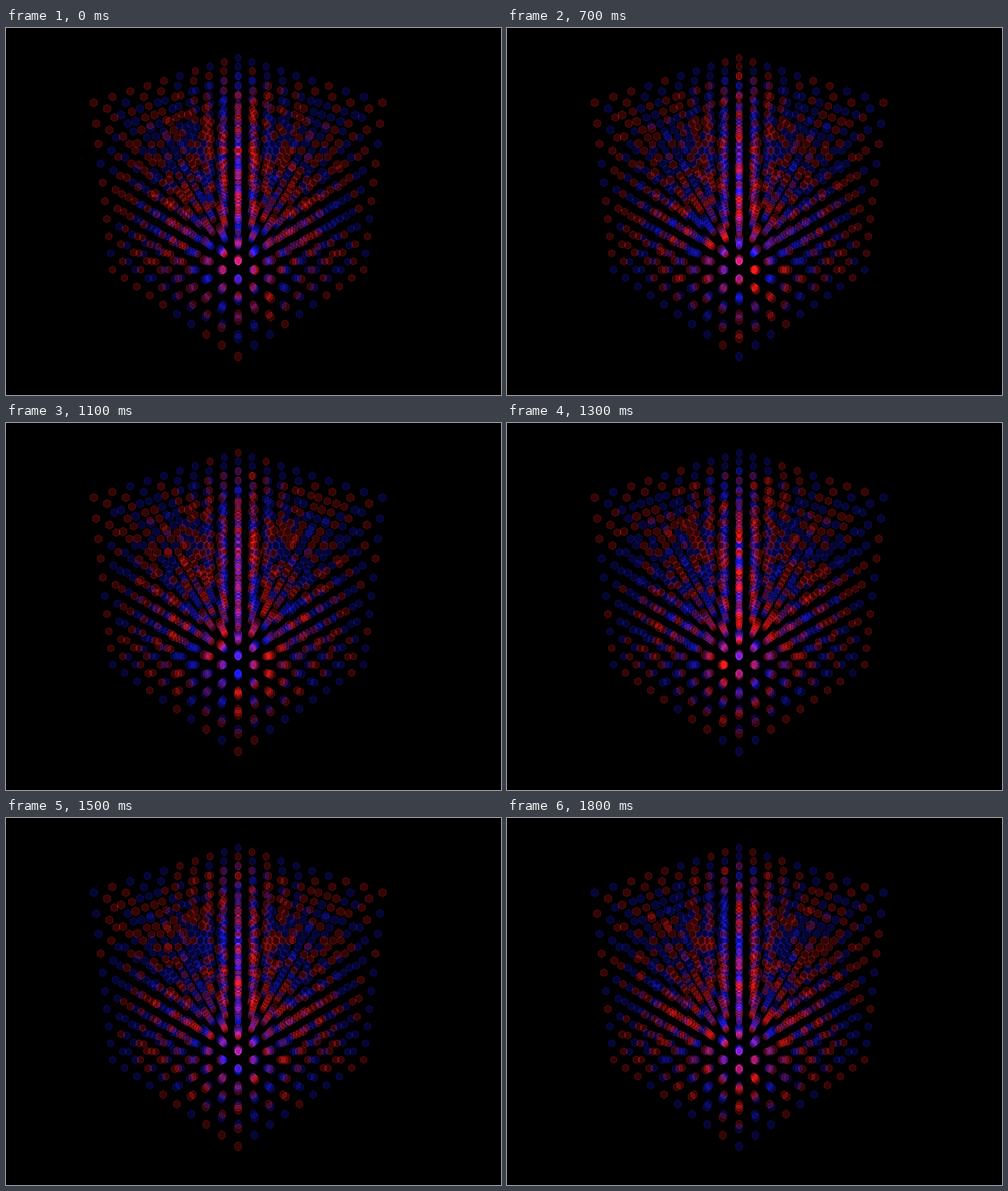
Animation, 869 px wide and 644 px high, one loop 2 s. Source, as an HTML page with a canvas:

```html
<!DOCTYPE html>
<html lang="en">
<head>
<meta charset="utf-8">
<title>Flickering lattice</title>
<style>
  html, body { margin: 0; width: 100%; height: 100%; overflow: hidden; background: #000; }
  canvas { display: block; }
</style>
</head>
<body>
<canvas id="stage" width="869" height="644"></canvas>
<script>
const ctx = document.getElementById("stage").getContext("2d");
const LOOP = 2000;
const CHANGES = [0, 400, 700, 800, 900, 1100, 1300, 1400, 1500, 1700, 1800];
const SIZE = 10;
const CENTER = 407.5;
const INKS = ["255,24,24", "24,24,255"].map(rgb => ({
  fill: `rgba(${rgb},0.2)`,
  line: `rgba(${rgb},0.36)`
}));

// Perspective view of lattice node (i, j, k); k counts downwards.
function project(i, j, k) {
  const depth = 1 - 0.0173 * (i + j) + 0.01406 * k;
  return {
    x: CENTER + 23.77 * (i - j) / depth,
    y: (52.5 + 6.455 * (i + j) + 33.46 * k) / depth,
    r: 6.2 / depth
  };
}

// Cells near the middle column look narrower, with blunt tips.
function cell({ x, y, r }) {
  const side = Math.min(1, Math.abs(x - CENTER) / 150);
  const half = r * (0.77 + 0.09 * side);
  const tip = half * 0.35 * (1 - side);
  const corners = [[tip, -r], [half, -r / 2], [half, r / 2], [tip, r]];
  const path = new Path2D();
  for (const [dx, dy] of corners) path.lineTo(x + dx, y + dy);
  for (const [dx, dy] of corners) path.lineTo(x - dx, y - dy);
  path.closePath();
  return path;
}

function seededRandom(seed) {
  return () => {
    seed = (seed + 0x6D2B79F5) | 0;
    let t = Math.imul(seed ^ (seed >>> 15), seed | 1);
    t ^= t + Math.imul(t ^ (t >>> 7), t | 61);
    return ((t ^ (t >>> 14)) >>> 0) / 4294967296;
  };
}

const nodes = [];
for (let k = 0; k < SIZE; k++)
  for (let j = 0; j < SIZE; j++)
    for (let i = 0; i < SIZE; i++) nodes.push(cell(project(i, j, k)));

function draw(state) {
  const random = seededRandom(state * 7919 + 11);
  ctx.globalCompositeOperation = "source-over";
  ctx.fillStyle = "#000";
  ctx.fillRect(0, 0, 869, 644);
  ctx.globalCompositeOperation = "lighter";
  ctx.lineWidth = 0.8;
  for (const node of nodes) {
    const ink = INKS[random() < 0.5 ? 0 : 1];
    ctx.fillStyle = ink.fill;
    ctx.strokeStyle = ink.line;
    ctx.fill(node);
    ctx.stroke(node);
  }
}

const start = performance.now();
let shown = -1;

function tick() {
  const time = (performance.now() - start) % LOOP;
  const state = CHANGES.filter(t => t <= time).length - 1;
  if (state !== shown) draw(shown = state);
  requestAnimationFrame(tick);
}
tick();
</script>
</body>
</html>
```
